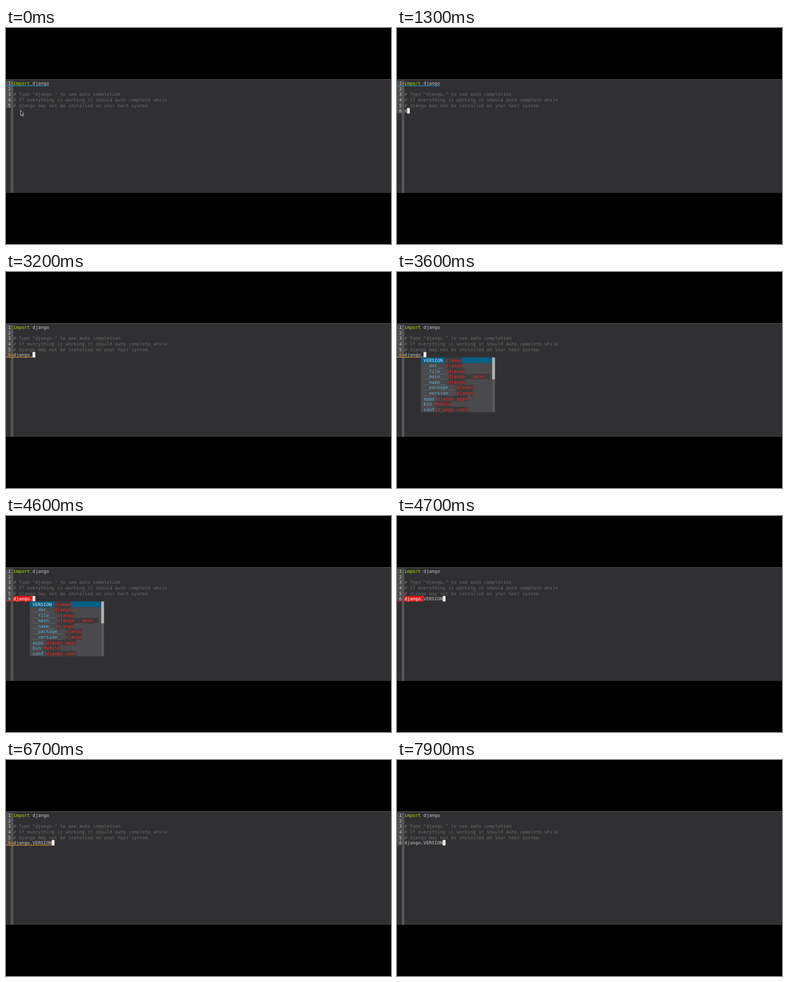
These frames come from a looping animation (600x338 px, 8 s). An HTML page:

```html
<!DOCTYPE html>
<html lang="en">
<head>
<meta charset="utf-8">
<title>Editor completion</title>
<style>
html, body { margin: 0; width: 100%; height: 100%; overflow: hidden; background: #000; }
svg { display: block; width: 100vw; height: 100vh; }
text {
  font: 7.11px "DejaVu Sans Mono", "Liberation Mono", monospace;
  white-space: pre;
  text-rendering: geometricPrecision;
}
</style>
</head>
<body>
<svg id="stage" viewBox="0 0 600 338"></svg>
<script>
const LOOP = 8000, CW = 4.28, LH = 8.56, LEFT = 11.4, TOP = 82.4;
const stage = document.getElementById('stage');
const C = {
  bg: '#302f31', gutter: '#4d4d4d', fringe: '#565656', fg: '#c6c6c6', comment: '#6a6a6a',
  green: '#a1db00', cyan: '#1f9fc4', red: '#e01b1b', amber: '#e0992e', cursor: '#eeeeee'
};

const col = n => LEFT + n * CW;
const row = n => TOP + n * LH;

function add(tag, attrs, parent = stage) {
  const el = document.createElementNS('http://www.w3.org/2000/svg', tag);
  for (const k in attrs) el.setAttribute(k, attrs[k]);
  return parent.appendChild(el);
}
const group = () => add('g', {});
const rect = (x, y, width, height, fill, parent) => add('rect', { x, y, width, height, fill }, parent);
function label(str, x, line, fill, style = {}, parent) {
  const el = add('text', { x, y: row(line) + 6.9, fill, ...style }, parent);
  el.textContent = str;
  return el;
}
const show = (el, on) => el.setAttribute('visibility', on ? 'visible' : 'hidden');
const bold = { 'font-weight': 700 }, italic = { 'font-style': 'italic' };

// Editor window
rect(0, 80, 600, 178, C.bg);
rect(0, 80, 600, 1.2, '#454446');
rect(0, TOP, 7.5, 5 * LH, C.gutter);
rect(7.5, TOP, 3.9, 258 - TOP, C.fringe);
for (let i = 0; i < 5; i++) label(i + 1, 3.3, i, C.fg, italic);

label('import', col(0), 0, C.green, bold);
label('django', col(7), 0, C.fg);
['# Type "django." to see auto completion',
 '# If everything is working it should auto complete while',
 '# django may not be installed on your host system'
].forEach((s, i) => label(s, col(0), i + 2, C.comment, italic));

const unused = group();
rect(0, row(1) - 0.9, col(13), 0.9, C.cyan, unused);
label('»', 7.4, 0, C.amber, bold, unused);

// Line being typed
const line6 = group();
rect(0, row(5), 7.5, LH, C.gutter, line6);
const number = label('6', 3.3, 5, C.fg, italic, line6);
const marker = label('»', 7.4, 5, C.red, bold, line6);
const rule = rect(0, row(6) - 0.9, 10, 0.9, C.amber, line6);
const errorBox = rect(col(0), row(5), 0, LH, C.red, line6);
const errorText = label('', col(0), 5, '#fff', bold, line6);
const code = label('', col(0), 5, C.fg, {}, line6);
const cursor = rect(0, row(5), CW, LH, C.cursor);

// Completion list
const popup = group();
const items = [
  ['VERSION', 'django'], ['__doc__', 'django'], ['__file__', 'django'],
  ['__main__', 'django.__main__'], ['__name__', 'django'], ['__package__', 'django'],
  ['__version__', 'django'], ['apps', 'django.apps'], ['bin', 'Module'], ['conf', 'django.conf']
];
rect(col(6), row(6), 26 * CW, 10 * LH, '#4a494b', popup);
rect(col(6), row(6), 26 * CW, LH, '#005f87', popup);
rect(col(32), row(6), CW, 10 * LH, '#5a5a5a', popup);
rect(col(32), row(6), CW, 4 * LH, '#b2b2b2', popup);
items.forEach(([name, note], i) => {
  const at = col(8 + name.length);
  rect(at, row(6 + i), note.length * CW, LH, '#3a393b', popup);
  label(name, col(7), 6 + i, i ? '#5fafd7' : '#d0e4ee', bold, popup);
  label(note, at, 6 + i, '#ef2929', bold, popup);
});

// Mouse pointer
const pointer = add('path', {
  d: 'M22.7 128.8V137l1.8-1.7 1.3 2.8 1.3-.6-1.3-2.7h2.4Z',
  fill: '#222', stroke: '#ddd', 'stroke-width': 0.7
});

// Each track lists [start time, value]
const tracks = {
  typed: [[0, ''], [1300, 'd'], [1800, 'dj'], [1900, 'dja'], [2000, 'djan'], [2100, 'djang'],
    [2300, 'django'], [3100, 'django.'], [4700, 'django.VERSION']],
  cursor: [[0, 0], [400, 1], [900, 0], [1300, 1], [2900, 0], [3100, 1], [4200, 0], [4600, 1],
    [5300, 0], [5700, 1], [6100, 0], [6700, 1], [7300, 0], [7900, 1]],
  error: [[0, 0], [1900, 2], [3200, 0], [4000, 7], [5100, 0]],
  warn: [[0, 0], [3200, 1], [4000, 0], [5600, 1], [7000, 0]]
};
const at = (name, t) => tracks[name].filter(k => k[0] <= t).pop()[1];

function draw(t) {
  const typed = at('typed', t), bad = at('error', t), warn = at('warn', t);
  const flag = bad ? C.red : C.amber;
  show(unused, t < 3200);
  show(pointer, t < 1300);
  show(line6, t >= 1300);
  show(popup, t >= 3600 && t < 4700);

  errorBox.setAttribute('width', bad * CW);
  errorText.textContent = typed.slice(0, bad);
  code.textContent = typed.slice(bad);
  code.setAttribute('x', col(bad));
  number.setAttribute('fill', warn ? C.amber : C.fg);
  marker.setAttribute('fill', flag);
  marker.setAttribute('opacity', bad || warn ? 1 : 0);
  rule.setAttribute('fill', flag);
  rule.setAttribute('width', warn ? col(typed.length) : bad ? LEFT : 0);

  cursor.setAttribute('x', col(typed.length));
  show(cursor, at('cursor', t));
}

const start = performance.now();
function tick() {
  draw((performance.now() - start) % LOOP);
  requestAnimationFrame(tick);
}
tick();
</script>
</body>
</html>
```
